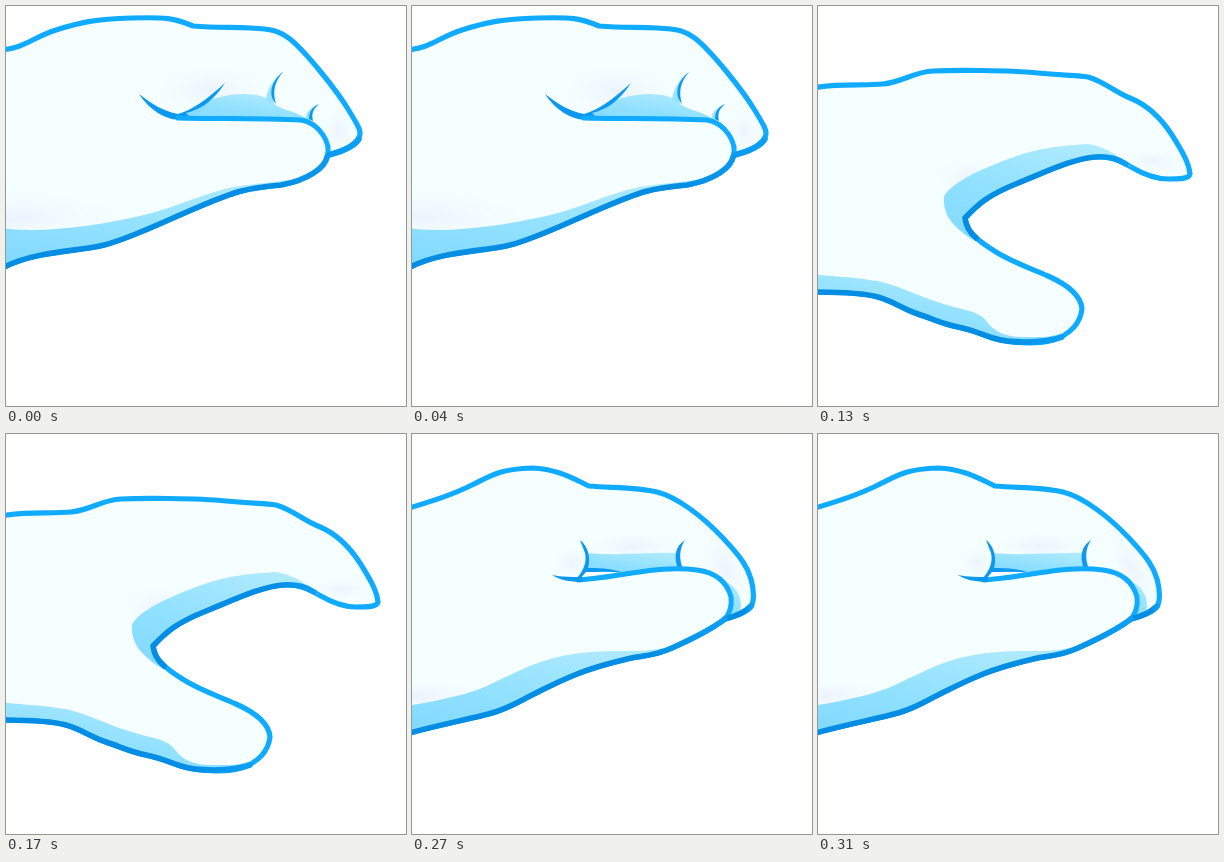
An HTML page without scripts for the animation above (0.34 s loop, 400 by 400 pixels).

```html
<!DOCTYPE html>
<html lang="en">
<head>
<meta charset="utf-8">
<title>Snapping hand</title>
<style>
  html, body { margin: 0; width: 100%; height: 100%; overflow: hidden; background: #fff; }
  svg { display: block; }
  path { stroke-linecap: round; stroke-linejoin: round; }
  .body { fill: #f5ffff; stroke: #10abff; stroke-width: 5.2; }
  .line { fill: none; stroke: #10abff; stroke-width: 5; }
  .under { fill: none; stroke: url(#ink); stroke-width: 5.6; }
  .shade { fill: url(#ice); }
  .crease { fill: #0c98ee; }
  .tint { fill: url(#blush); mix-blend-mode: darken; }

  /* Five poses sit side by side; the reel jumps from one to the next. */
  .reel { animation: reel 340ms step-end infinite; }
  @keyframes reel {
    0% { transform: translateX(0); }
    20.588% { transform: translateX(-400px); }
    38.235% { transform: translateX(-800px); }
    58.824% { transform: translateX(-1200px); }
    79.412%, 100% { transform: translateX(-1600px); }
  }
</style>
</head>
<body>
<svg width="100%" height="100%" viewBox="0 0 400 400">
  <defs>
    <linearGradient id="ink">
      <stop offset=".75" stop-color="#048de2"/>
      <stop offset="1" stop-color="#0c9ff4"/>
    </linearGradient>
    <linearGradient id="ice" x1="0" y1="1" x2=".7" y2="0">
      <stop stop-color="#80d9ff"/>
      <stop offset=".5" stop-color="#92e1ff"/>
      <stop offset="1" stop-color="#aeeaff"/>
    </linearGradient>
    <radialGradient id="blush">
      <stop stop-color="#ecf3ff"/>
      <stop offset="1" stop-color="#f5ffff" stop-opacity="0"/>
    </radialGradient>
  </defs>

  <g class="reel">
    <!-- closed, raised -->
    <svg width="400" height="400">
      <path class="body" d="M-6 44C20 42 25 32 50 24S90 13 125 12S168 12 187 20C210 22 225 21 245 22S272 24 284 33C301 47 331 85 342 103S356 126 353 131C350 139 340 144 322 149C319 162 302 174 275 179C240 182 230 185 190 202S125 232 98 239S30 244 -6 263Z"/>
      <ellipse class="tint" cx="205" cy="84" rx="70" ry="32"/>
      <ellipse class="tint" cx="332" cy="125" rx="20" ry="30"/>
      <ellipse class="tint" cx="10" cy="212" rx="130" ry="36"/>
      <path class="shade" d="M-6 222C40 228 90 219 125 212S190 191 215 184S265 178 302 171C293 177 285 178 275 179C240 182 230 185 190 202S125 232 98 239S30 244 -6 263Z"/>
      <path class="shade" d="M172 112C190 99 205 90 235 88C255 88 263 92 268 98C278 105 290 105 303 114Z"/>
      <path class="crease" d="M133 88C146 98 157 105 172 108C188 103 200 94 219 77C209 93 194 105 176 114C158 114 143 103 133 88Z"/>
      <path class="shade" d="M180 107C195 103 203 97 212 86C203 99 196 105 184 111ZM277 66C269 74 265 84 268 98L260 94C261 82 269 71 277 66ZM313 98C307 103 305 108 307 115L300 112C300 106 305 101 313 98Z"/>
      <path class="crease" d="M277 66C269 75 266 85 270 98C261 88 266 74 277 66ZM313 98C307 103 305 108 307 115L303 113C303 106 306 101 313 98Z"/>
      <path class="line" d="M172 112C210 113 250 112 295 114C313 117 326 137 321 151"/>
      <path class="under" d="M353 133C349 140 338 145 323 149M321 151C319 162 302 174 275 179C240 182 230 185 190 202S125 232 98 239S30 244 -6 263"/>
    </svg>

    <!-- opening -->
    <svg x="400" width="400" height="400">
      <path class="body" d="M-6 88C30 75 65 61 105 57S180 56 235 53C259 55 272 66 300 76C318 78 325 80 340 98C355 119 370 137 379 155C384 168 374 178 364 178C354 175 341 161 325 152C306 143 293 138 270 138C238 141 215 151 190 157S142 169 130 179S126 199 137 206C155 217 180 217 200 218S245 219 265 225C288 232 309 248 311 264C311 279 304 285 292 284C275 284 260 282 245 285S205 295 170 296S130 293 100 293S50 292 42 288S15 286 -6 290Z"/>
      <path class="shade" d="M131 205C110 195 102 182 108 172C118 151 150 138 180 129C210 121 240 119 277 118L265 109C290 122 305 128 325 151C306 143 293 138 270 138C238 141 215 151 190 157S142 169 130 179S126 199 131 205Z"/>
      <path class="shade" d="M-6 271C15 268 36 268 50 272C70 283 100 287 130 290C150 292 165 294 180 295C150 297 130 293 100 293S50 292 42 288S15 286 -6 290Z"/>
      <path class="shade" d="M222 290C240 278 258 270 275 270S304 272 306 250C312 262 310 283 292 284S260 282 245 285Z"/>
      <path class="under" d="M345 165C338 160 333 156 325 152C306 143 293 138 270 138C238 141 215 151 190 157S142 169 130 179C124 185 124 194 129 200"/>
      <path class="under" d="M311 266C310 280 304 285 292 284C275 284 260 282 245 285"/>
      <path class="under" d="M180 296C150 296 130 293 100 293S50 292 42 288S15 286 -6 290"/>
    </svg>

    <!-- wide open -->
    <svg x="800" width="400" height="400">
      <path class="body" d="M-6 82C20 77 45 80 65 78S95 66 115 65S190 64 220 67S257 69 270 71C287 76 297 86 312 92S341 109 354 129C366 148 371 158 372 168C371 173 362 173 350 173S325 168 313 161S292 150 277 151C254 153 230 165 200 177S160 198 147 212C149 227 162 236 178 246S212 262 230 270S263 289 264 303C262 319 250 329 235 334S190 337 175 332S155 324 140 321S115 313 100 308S75 295 60 291S20 286 -6 286Z"/>
      <ellipse class="tint" cx="336" cy="155" rx="36" ry="16"/>
      <ellipse class="tint" cx="152" cy="172" rx="44" ry="26"/>
      <path class="shade" d="M155 234C132 219 125 207 126 191C130 180 155 166 190 153S245 140 270 138C288 141 300 149 313 161C300 154 292 150 277 151C254 153 230 165 200 177S160 198 147 212Z"/>
      <path class="shade" d="M-6 268C25 272 55 271 80 281S120 297 140 302S164 309 170 317S187 331 205 331S232 332 247 326C235 336 200 338 175 332S155 324 140 321S115 313 100 308S75 295 60 291S20 286 -6 286Z"/>
      <path class="under" d="M308 158C300 153 292 150 277 151C254 153 230 165 200 177S160 198 147 212C148 220 152 227 158 232"/>
      <path class="under" d="M244 331C225 338 190 337 175 332S155 324 140 321S115 313 100 308S75 295 60 291S20 286 -6 286"/>
    </svg>

    <!-- closing -->
    <svg x="1200" width="400" height="400">
      <path class="body" d="M-6 88C30 80 70 68 110 60C128 58 148 58 160 61S180 69 190 72S235 81 252 87S285 110 310 127S340 150 347 160S360 190 363 203C363 211 355 215 345 215S325 202 310 195S278 181 255 180S205 187 185 196S165 208 166 214S180 229 200 234S235 239 255 244S310 266 318 284C321 293 316 309 313 314S303 322 290 320S225 311 200 306S160 299 130 297S50 292 20 290S4 285 -6 280Z"/>
      <ellipse class="tint" cx="300" cy="167" rx="38" ry="12"/>
      <ellipse class="tint" cx="38" cy="264" rx="50" ry="14"/>
      <path class="shade" d="M165 216C159 200 163 185 180 174C197 164 225 162 245 164C265 168 287 169 303 180S337 206 361 205C358 213 352 215 345 215S325 202 310 195S278 181 255 180S205 187 185 196S165 208 165 216Z"/>
      <path class="shade" d="M-6 256C15 268 30 276 60 278C75 278 88 277 100 278S125 284 140 286S190 297 215 302S285 316 302 308S312 295 317 286C320 295 316 309 313 314S303 322 290 320S225 311 200 306S160 299 130 297S50 292 20 290S4 285 -6 280Z"/>
      <path class="under" d="M361 209C357 214 352 215 345 215S325 202 310 195S278 181 255 180S205 187 185 196S165 208 166 214"/>
      <path class="under" d="M319 290C319 298 316 309 313 314S303 322 290 320S225 311 200 306S160 299 130 297S50 292 20 290S4 285 -6 280"/>
    </svg>

    <!-- closed, lowered -->
    <svg x="1600" width="400" height="400">
      <path class="body" d="M-6 75C20 67 40 61 60 51S88 35 120 34C145 35 160 44 177 52C200 54 225 53 245 58S290 82 310 103S336 134 339 145S342 165 340 171S325 182 313 185C300 195 280 205 260 214S232 221 215 225S185 232 165 240S136 253 120 261S97 274 80 279S25 291 -6 300Z"/>
      <ellipse class="tint" cx="314" cy="134" rx="22" ry="52" transform="rotate(-28 314 134)"/>
      <ellipse class="tint" cx="222" cy="112" rx="60" ry="18"/>
      <ellipse class="tint" cx="160" cy="129" rx="24" ry="22"/>
      <ellipse class="tint" cx="10" cy="262" rx="80" ry="22"/>
      <path class="shade" d="M-6 272C25 267 55 261 75 252S120 228 150 222S205 217 220 217S245 215 262 212C245 220 232 221 215 225S185 232 165 240S136 253 120 261S97 274 80 279S25 291 -6 300Z"/>
      <path class="shade" d="M176 119C205 122 235 118 267 119L269 135L205 139L174 136Z"/>
      <path class="shade" d="M310 146C328 153 332 169 327 181L314 184C321 170 318 158 310 146Z"/>
      <path fill="#fff" d="M170 144L174 138L215 138Z"/>
      <path class="crease" d="M168 106C176 112 179 124 176 134C191 134 202 135 212 139C198 137 186 138 174 138L168 145L164 145C172 136 175 128 173 119ZM273 106C267 115 267 125 271 135L266 135C261 121 264 112 273 106Z"/>
      <path class="line" d="M166 146C185 145 200 142 220 139S262 133 285 136S316 152 319 163C320 172 318 179 313 185"/>
      <path class="crease" d="M140 141C150 143 160 143 170 143V148C158 148 148 146 140 141Z"/>
      <path class="under" d="M339 172C333 178 325 182 313 185"/>
      <path class="under" d="M313 185C300 195 280 205 260 214S232 221 215 225S185 232 165 240S136 253 120 261S97 274 80 279S25 291 -6 300"/>
    </svg>
  </g>
</svg>
</body>
</html>
```
